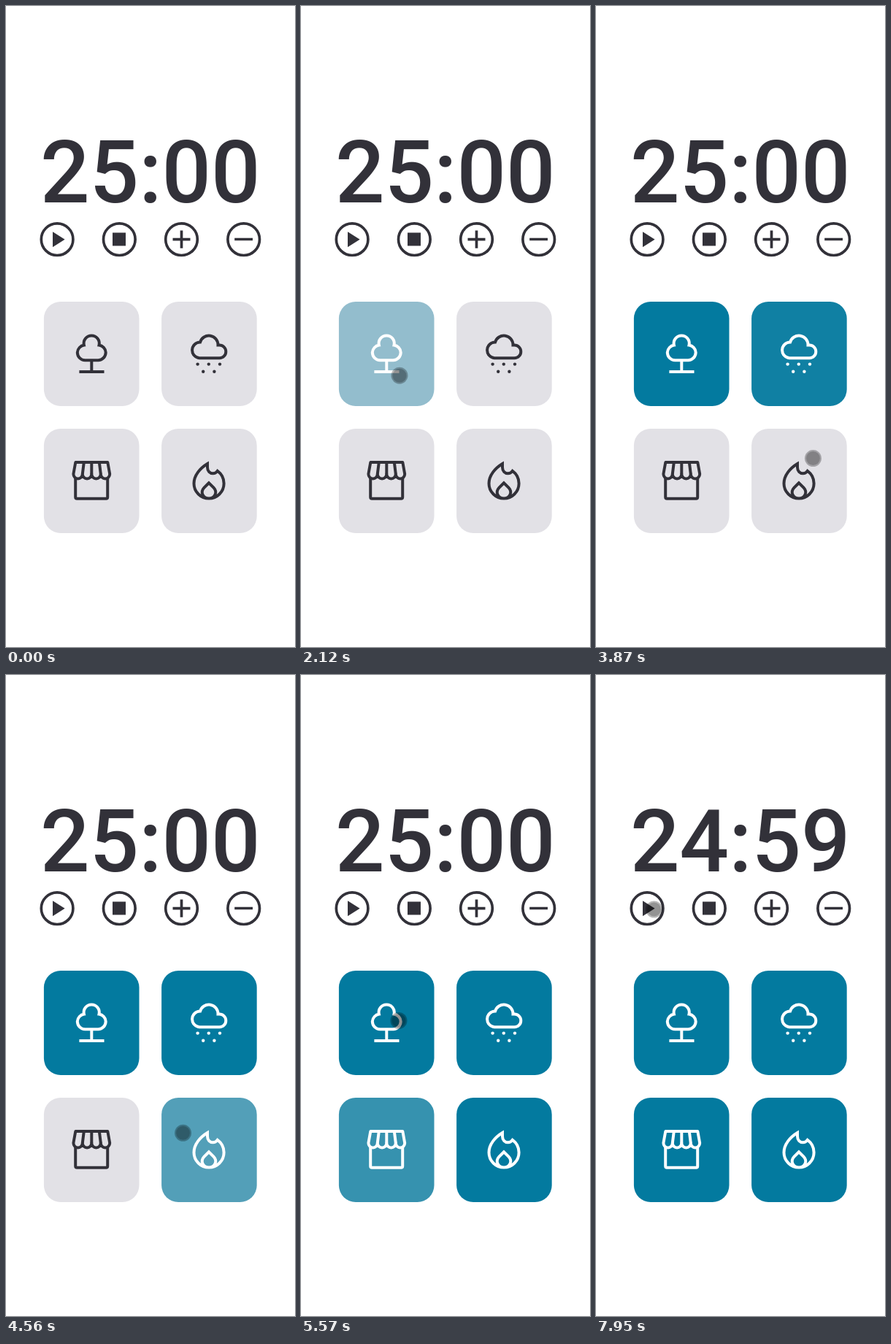
These frames come from a looping animation (396x878 px, 8 s). An HTML page:

```html
<!DOCTYPE html>
<html lang="en">
<head>
<meta charset="utf-8">
<title>Focus timer</title>
<style>
  html, body { margin: 0; width: 100%; height: 100%; overflow: hidden; background: #fff; }
  svg { display: block; width: 396px; height: 878px; color: #323139; }
  #clock { font: 500 118.8px Roboto, Arial, sans-serif; fill: currentColor; }
  .line { fill: none; stroke: currentColor; stroke-width: 4; }
  .solid { fill: currentColor; }
  #controls .line { stroke-width: 3.7; }
  .card rect { width: 130.6px; height: 143px; rx: 23px; }
</style>
</head>
<body>
<svg viewBox="0 0 396 878">
  <text id="clock" x="197.8" y="268.9" text-anchor="middle">25:00</text>

  <g id="controls">
    <path class="solid" d="M64 309.3L80.6 319.7L64 330.2ZM146 310.6H164V328.6H146Z"/>
    <path class="line" d="M228.5 319.7H252.5M240.5 307.6V331.8M313.2 319.5H338"/>
  </g>

  <g class="card" id="forest">
    <path class="line" d="M108.3 485.3H126.3A10.9 10.9 0 0 0 136.7 474.6A10.7 10.7 0 0 0 127.5 464.6
      A10.6 10.6 0 1 0 106.9 464.6A10.7 10.7 0 0 0 97.8 474.6A10.9 10.9 0 0 0 108.3 485.3Z
      M117.3 485V501M100.4 501H134.5"/>
  </g>

  <g class="card" id="rain">
    <path class="line" d="M265 482.2H292.5A8.8 8.8 0 0 0 292.5 464.6H290.5
      A12.5 12.5 0 0 0 266 460.6A10.82 10.82 0 0 0 265 482.2Z"/>
  </g>

  <g class="card" id="shop">
    <g class="line" stroke-linejoin="round">
      <path d="M95.3 625H139.3L142.2 641A6.2 6.4 0 0 1 129.8 641A6.25 6.4 0 0 1 117.3 641
        A6.25 6.4 0 0 1 104.8 641A6.2 6.4 0 0 1 92.4 641Z"/>
      <path d="M106.8 625L104.8 641M117.3 625V641M127.8 625L129.8 641"/>
      <path d="M95.2 646V672.8Q95.2 674.8 97.2 674.8H137.2Q139.2 674.8 139.2 672.8V646"/>
    </g>
  </g>

  <g class="card" id="fire">
    <path class="line" d="M276 627C266 633 257.5 643 257.5 654A20.5 20.5 0 0 0 298.6 654
      C298.6 647 295.5 641 289.8 636.9C288.3 639 286 640.3 283.6 640.3C279.5 640.3 276 637 276 632Z
      M278 653.3L271.6 659.6C265.5 666 270 674.5 278 674.5C286 674.5 290.5 666 284.4 659.6Z"/>
  </g>

  <g id="pointer">
    <circle r="11.5" fill-opacity=".28"/>
    <circle r="9.5" fill-opacity=".2"/>
  </g>
</svg>
<script>
const LOOP = 8000, FADE = 700, TICK = 7490;
const IDLE = [226, 225, 230], ACTIVE = [3, 122, 159];
const presses = { forest: 1960, rain: 3326, fire: 4250, shop: 5180 };

const ENTRY = { at: 770, x: 357, y: 856 };
const moves = [
  { from: 770, to: 1170, x: 257.5, y: 533.5 },
  { from: 1170, to: 1520, x: 126.5, y: 526.5 },
  { from: 1520, to: 1850, x: 115.5, y: 508.5 },
  { from: 2080, to: 2720, x: 309.5, y: 485.5 },
  { from: 3440, to: 3870, x: 297.5, y: 619.5 },
  { from: 3870, to: 4140, x: 291, y: 626.5 },
  { from: 4400, to: 5030, x: 167, y: 628.5 },
  { from: 5300, to: 5960, x: 112, y: 370.5 },
  { from: 5960, to: 6500, x: 79.5, y: 321 }
];

const find = id => document.getElementById(id);
const mix = (a, b, p) => a + (b - a) * p;
const glide = (t, from, to) => Math.sin(Math.min(1, Math.max(0, (t - from) / (to - from))) * Math.PI / 2);

function add(parent, tag, attrs) {
  const node = document.createElementNS('http://www.w3.org/2000/svg', tag);
  for (const key in attrs) node.setAttribute(key, attrs[key]);
  parent.prepend(node);
  return node;
}

for (let i = 0; i < 4; i++) {
  add(find('controls'), 'circle', { class: 'line', cx: 70.1 + 85.2 * i, cy: 319.7, r: 21.8 });
}
for (let i = 0; i < 5; i++) {
  add(find('rain'), 'circle', { class: 'solid', cx: 262.6 + 7.6 * i, cy: i % 2 ? 500.8 : 490.6, r: 2.2 });
}
const cards = [...document.querySelectorAll('.card')].map((card, i) => ({
  card,
  press: presses[card.id],
  tile: add(card, 'rect', { x: 51.9 + 161.2 * (i % 2), y: 405.1 + 173.8 * (i >> 1) })
}));

function draw(t) {
  find('clock').textContent = t < TICK ? '25:00' : '24:59';

  for (const { card, press, tile } of cards) {
    const level = glide(t, press, press + FADE);
    card.style.color = level > 0 ? '#fff' : '';
    tile.style.fill = `rgb(${IDLE.map((v, c) => Math.round(mix(v, ACTIVE[c], level)))})`;
  }

  let { x, y } = ENTRY;
  for (const move of moves) {
    const p = glide(t, move.from, move.to);
    x = mix(x, move.x, p);
    y = mix(y, move.y, p);
  }
  find('pointer').setAttribute('transform', `translate(${x} ${y})`);
  find('pointer').setAttribute('visibility', t < ENTRY.at ? 'hidden' : 'visible');
}

const start = performance.now();
function tick() {
  draw((performance.now() - start) % LOOP);
  requestAnimationFrame(tick);
}
tick();
</script>
</body>
</html>
```
